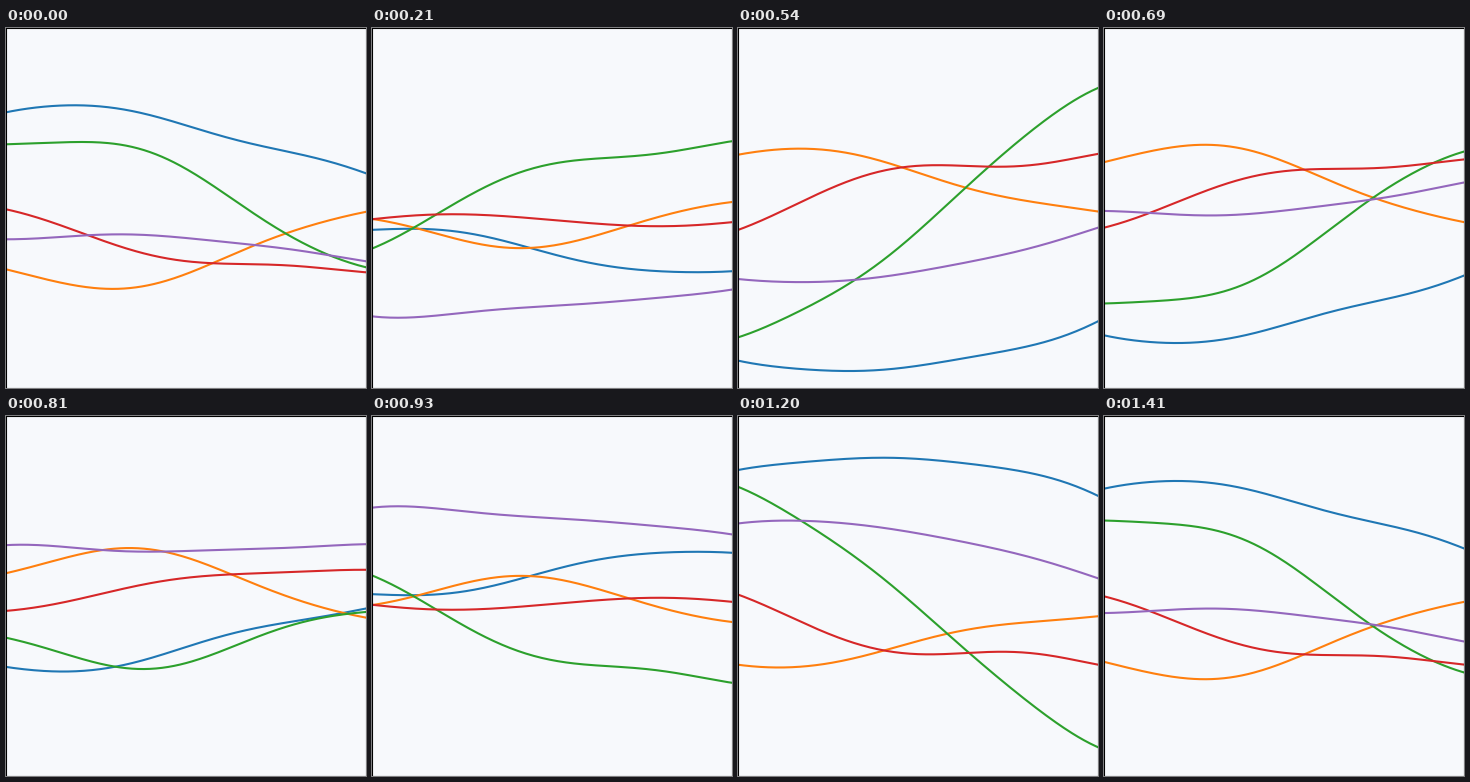
Recreate the animation shown at these times as a matplotlib script. Size 360x360 px, loop 1440 ms.

```python
import numpy as np
import matplotlib.pyplot as plt
from matplotlib.animation import FuncAnimation

SIZE, DPI = 360, 100
FRAMES, INTERVAL = 48, 30
MEAN = 190    # resting height of every curve, in pixels from the top
SCALE = 110   # distance over which a curve bends, in pixels

# A curve turns between two smooth shapes, each given by its offset from MEAN
# at a few evenly spaced points: MEAN + first * cos(t) + second * sin(t).
SHAPES = {
    "tab:blue": ([-105.7, -112.7, -102.9, -81.9, -65, -44.7],
                 [96, 101.8, 111.8, 118.9, 117, 101.4]),
    "tab:orange": ([51.3, 67.9, 66.9, 41.1, 12.7, -6.2],
                   [-38.2, -29.9, -13.4, -6.6, -11.6, -15.4]),
    "tab:green": ([-73.7, -76, -65.9, -26.2, 20.2, 49.3],
                  [95.1, 48.1, -5.2, -54, -97, -134.6]),
    "tab:red": ([-8.7, 13.6, 36.9, 45.6, 47.8, 54.3],
                [8.2, -15.1, -29.6, -28.7, -26.3, -36.4]),
    "tab:purple": ([21.3, 17.8, 17.2, 23.6, 31.8, 43.3],
                   [107.6, 108.4, 100.4, 89.8, 76, 57]),
}


def kernel(p, q):
    return np.exp(-(np.subtract.outer(p, q) / SCALE) ** 2 / 2)


def smooth(offsets, x):
    """Smooth curve through evenly spaced offsets (Gaussian interpolation)."""
    knots = np.linspace(0, SIZE, len(offsets))
    return kernel(x, knots) @ np.linalg.solve(kernel(knots, knots), offsets)


fig = plt.figure(figsize=(SIZE / DPI, SIZE / DPI), dpi=DPI, facecolor="#f7f9fc")
ax = fig.add_axes([0, 0, 1, 1], facecolor="none")
ax.set(xlim=(0, SIZE), ylim=(SIZE, 0), xticks=[], yticks=[])

x = np.linspace(-2, SIZE + 2, 183)
curves = []
for color, (first, second) in SHAPES.items():
    line, = ax.plot([], [], color=color, lw=1.5)
    curves.append((line, smooth(first, x), smooth(second, x)))


def update(i):
    t = 2 * np.pi * i / FRAMES
    for line, first, second in curves:
        line.set_data(x, MEAN + first * np.cos(t) + second * np.sin(t))
    return [curve[0] for curve in curves]


anim = FuncAnimation(fig, update, frames=FRAMES, interval=INTERVAL,
                     repeat=True, repeat_delay=0)
plt.show()
```
